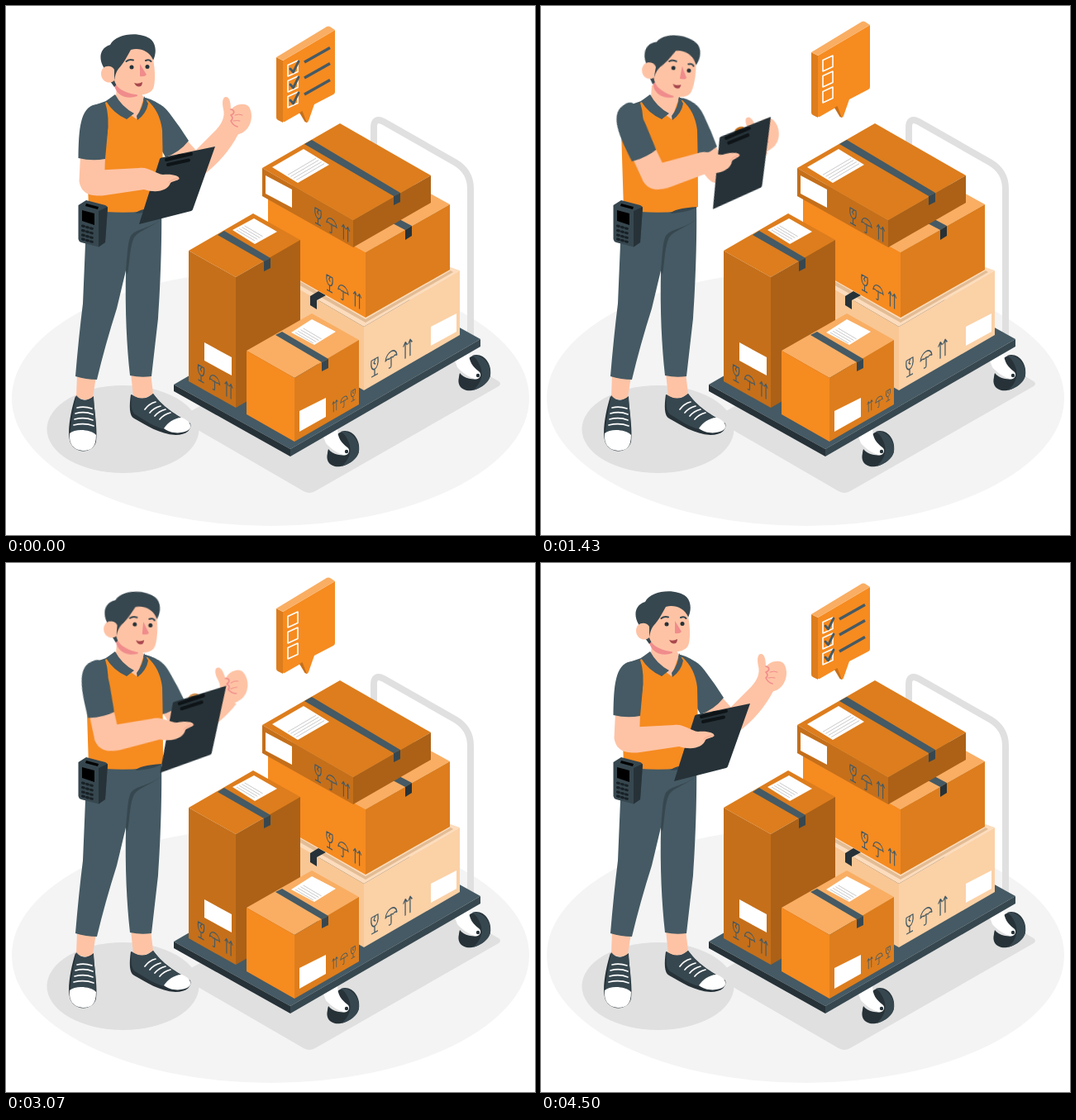
Write an HTML page that moves like this. It is 640 px wide and 640 px high and loops after 4780 ms.

```html
<!DOCTYPE html>
<html lang="en">
<head>
<meta charset="utf-8">
<title>Delivery check</title>
<style>
html, body { margin: 0; width: 100%; height: 100%; overflow: hidden; background: #fff; }
svg { display: block; width: 100vw; height: 100vh; }

.or { fill: #f68b20; } .or1 { fill: #dd7d1d; } .or2 { fill: #c56f1a; } .or3 { fill: #ac6116; }
.light { fill: #f9ae63; } .pale { fill: #fbd1a6; }
.slate { fill: #455a64; } .deep { fill: #37474f; } .night { fill: #263238; }
.skin { fill: #fec3a5; } .pink { fill: #f08c8c; } .grey { fill: #e0e0e0; } .white { fill: #fff; }
.line { fill: none; stroke-linecap: round; stroke-linejoin: round; }
.text { stroke: #c4c4c4; stroke-width: .9; fill: none; }
.ico { stroke: #455a64; stroke-width: 1.3; fill: none; stroke-linejoin: round; }

.a { animation: 4780ms linear infinite; }
#head { animation-name: head; transform-origin: 151px 117px; }
#bubble { animation-name: bubble; }
#front { animation-name: front; transform-origin: 107px 140px; }
#fore { animation-name: fore; transform-origin: 103px 212px; }
#back { animation-name: back; transform-origin: 183px 128px; }
#backFore { animation-name: backFore; transform-origin: 230px 193px; }
#hand { animation-name: hand; transform-origin: 272px 148px; }
#board { animation-name: board; transform-origin: 186px 185px; }
#knob { animation-name: knob; }
#smile { animation-name: smile; }
#flat { animation-name: flat; }
.tick { animation-name: tick; }
.tick.late { animation-name: tickLate; }
.row { stroke-dasharray: 1 2; }
#row1 { animation-name: row1; } #row2 { animation-name: row2; } #row3 { animation-name: row3; }

@keyframes head {
  0%, 11.9% { transform: rotate(0deg); animation-timing-function: ease-in; }
  19.46% { transform: rotate(2.5deg); }
  29.92% { transform: rotate(11deg); animation-timing-function: ease-out; }
  40.4%, 47.9% { transform: rotate(14.5deg); animation-timing-function: ease-in-out; }
  56.7% { transform: rotate(11deg); animation-timing-function: ease-in-out; }
  71.1%, 100% { transform: rotate(0deg); }
}
@keyframes bubble {
  0%, 11.9% { transform: translateY(0); animation-timing-function: ease-in; }
  19.46% { transform: translateY(-1px); }
  29.92% { transform: translateY(-6px); }
  40.4% { transform: translateY(-11px); animation-timing-function: ease-out; }
  49%, 58.6% { transform: translateY(-12.5px); animation-timing-function: ease-in-out; }
  71.76% { transform: translateY(2px); animation-timing-function: ease-in-out; }
  86%, 100% { transform: translateY(0); }
}
@keyframes front {
  0%, 11.9% { transform: rotate(0deg); animation-timing-function: ease-in; }
  19.46% { transform: rotate(-14deg); animation-timing-function: ease-out; }
  29.92% { transform: rotate(-27.5deg); animation-timing-function: ease-out; }
  40.4%, 57.5% { transform: rotate(-29deg); animation-timing-function: ease-in-out; }
  71.1%, 100% { transform: rotate(0deg); }
}
@keyframes fore {
  0%, 11.9% { transform: rotate(0deg); animation-timing-function: ease-in; }
  19.46% { transform: rotate(8deg); animation-timing-function: ease-out; }
  29.92% { transform: rotate(15.5deg); animation-timing-function: ease-out; }
  40.4%, 57.5% { transform: rotate(16.4deg); animation-timing-function: ease-in-out; }
  71.1%, 100% { transform: rotate(0deg); }
}
@keyframes back {
  0%, 11.9% { transform: rotate(0deg); animation-timing-function: ease-in; }
  19.46% { transform: rotate(4deg); animation-timing-function: ease-out; }
  29.92% { transform: rotate(12deg); animation-timing-function: ease-out; }
  40.4%, 57.5% { transform: rotate(14deg); animation-timing-function: ease-in-out; }
  71.1%, 100% { transform: rotate(0deg); }
}
@keyframes backFore {
  0%, 11.9% { transform: rotate(0deg); animation-timing-function: ease-in; }
  19.46% { transform: rotate(0deg); animation-timing-function: ease-out; }
  29.92% { transform: rotate(3deg); animation-timing-function: ease-out; }
  40.4%, 57.5% { transform: rotate(7deg); animation-timing-function: ease-in-out; }
  71.1%, 100% { transform: rotate(0deg); }
}
@keyframes hand {
  0%, 11.9% { transform: rotate(0deg); animation-timing-function: ease-in; }
  19.46% { transform: rotate(-9deg); animation-timing-function: ease-out; }
  29.92% { transform: rotate(-34deg); animation-timing-function: ease-out; }
  40.4%, 57.5% { transform: rotate(-44deg); animation-timing-function: ease-in-out; }
  71.76% { transform: rotate(-3deg); animation-timing-function: ease-in-out; }
  77.4% { transform: rotate(-6deg); animation-timing-function: ease-in-out; }
  84% { transform: rotate(2deg); animation-timing-function: ease-in-out; }
  91.2%, 100% { transform: rotate(0deg); }
}
@keyframes board {
  0%, 11.9% { transform: matrix(1, 0, 0, 1, 0, 0); animation-timing-function: ease-in; }
  19.46% { transform: matrix(.995, -.087, .112, 1.01, 17, -9); animation-timing-function: ease-out; }
  29.92% { transform: matrix(.972, -.155, .206, 1.039, 30, -25); animation-timing-function: ease-out; }
  40.4%, 57.5% { transform: matrix(.981, -.165, .247, 1.062, 31, -30); animation-timing-function: ease-in-out; }
  71.1%, 100% { transform: matrix(1, 0, 0, 1, 0, 0); }
}
@keyframes knob { 0%, 13% { opacity: 0; } 18%, 63% { opacity: 1; } 69%, 100% { opacity: 0; } }
@keyframes smile { 0%, 34% { opacity: 1; } 34.1%, 62% { opacity: 0; } 62.1%, 100% { opacity: 1; } }
@keyframes flat { 0%, 34% { opacity: 0; } 34.1%, 62% { opacity: 1; } 62.1%, 100% { opacity: 0; } }
@keyframes tick { 0%, 1% { opacity: 1; } 11.9%, 66% { opacity: 0; } 71.76% { opacity: .6; } 76%, 100% { opacity: 1; } }
@keyframes tickLate { 0%, 1% { opacity: 1; } 11.9%, 72.5% { opacity: 0; } 82%, 100% { opacity: 1; } }
@keyframes row1 {
  0%, 1% { stroke-dashoffset: 0; animation-timing-function: ease-in-out; }
  11.9%, 65% { stroke-dashoffset: 1; }
  71.76% { stroke-dashoffset: .48; animation-timing-function: ease-out; }
  94.1%, 100% { stroke-dashoffset: 0; }
}
@keyframes row2 {
  0%, 1% { stroke-dashoffset: 0; animation-timing-function: ease-in-out; }
  11.9%, 67% { stroke-dashoffset: 1; }
  71.76% { stroke-dashoffset: .72; animation-timing-function: ease-out; }
  94.1%, 100% { stroke-dashoffset: 0; }
}
@keyframes row3 {
  0%, 1% { stroke-dashoffset: 0; animation-timing-function: ease-in-out; }
  11.9%, 72.2% { stroke-dashoffset: 1; animation-timing-function: ease-out; }
  94.1%, 100% { stroke-dashoffset: 0; }
}
</style>
</head>
<body>
<svg viewBox="0 0 640 640">
  <defs>
    <g id="glass" class="ico"><path d="M-4-9H4C5-2 3 2 0 2S-5-2-4-9ZM0 2V9M-4 9H4M1-9L-1-5L1-3"/></g>
    <g id="umbrella" class="ico"><path d="M-7 0C-6-10 6-10 7 0Q4.500-2 2.300 0Q0-2-2.300 0Q-4.500-2-7 0ZM0-1V8Q0 11-3 9.500"/></g>
    <g id="arrows" class="ico"><path d="M-3 9V-8M-5.500-5L-3-9L-.5-5M3 9V-8M.5-5L3-9L5.500-5"/></g>
    <g id="iconsL">
      <use href="#glass" transform="matrix(.87 .5 0 1 0 0)"/>
      <use href="#umbrella" transform="matrix(.87 .5 0 1 16.500 10)"/>
      <use href="#arrows" transform="matrix(.87 .5 0 1 33.500 20)"/>
    </g>
    <path id="print" class="text" d="M0 0l22 13M3.200-1.700l22 13M6.400-3.400l22 13M9.600-5.100l22 13"/>
    <g id="wheel">
      <path class="night" d="M389 541C391 528 400 515 410 514C421 514 429 526 427 539C424 551 408 559 398 557C390 555 387 549 389 541Z"/>
      <path class="deep" d="M405 515C416 512 429 526 427 539C425 548 416 554 406 557C414 550 418 541 416 532C414 524 410 518 405 515Z"/>
      <path class="white" d="M384 521L401 512C401 522 406 529 413 534C417 537 415 543 410 543.500C400 543 391 537 387 529Z"/>
      <path class="grey" d="M387 529C393 536 401 541 410 543.500C400 544 389 540 387 529Z"/>
      <circle class="night" cx="412" cy="539" r="2.200"/>
    </g>
  </defs>

  <ellipse cx="320" cy="474.500" rx="313" ry="154.500" fill="#f4f4f4"/>
  <ellipse class="grey" cx="141.500" cy="512" rx="92" ry="53"/>
  <path class="grey" d="M222 491L242 480L540 421L596 454Q600 457 596 460L374 587Q367 591 360 587L222 507Z"/>

  <!-- trolley -->
  <path class="line" d="M445 170V147Q445 134 457 140L543 189Q562 200 562 221V402" stroke="#e0e0e0" stroke-width="8"/>
  <use href="#wheel"/>
  <use href="#wheel" x="159" y="-92"/>
  <path class="slate" d="M203 458L433 325L574 403L344 536Z"/>
  <path class="night" d="M203 458L344 536V545L203 466Z"/>
  <path class="deep" d="M344 536L574 403V412L344 545Z"/>

  <!-- pale box -->
  <path fill="#fcdcbc" d="M340 334L435 280L549 320L433 388Z"/>
  <path fill="#f9c794" d="M340 334L433 388V465L340 412Z"/>
  <path class="pale" d="M433 388L549 320V398L433 465Z"/>
  <path fill="#e2bc95" d="M352 331L435 379L538 320L541 322L435 383L352 336Z"/>
  <path class="night" d="M368 351L378 345L387 350L376 356V367L368 362Z"/>
  <path class="white" d="M514 388L545 372V394L514 411Z"/>
  <use href="#glass" transform="matrix(.98 -.56 0 1.100 446 437)"/>
  <use href="#umbrella" transform="matrix(.98 -.56 0 1.100 466 426)"/>
  <use href="#arrows" transform="matrix(.98 -.56 0 1.100 486 415)"/>

  <!-- middle box -->
  <path class="light" d="M317 233L419 175L537 240L435 298Z"/>
  <path class="or" d="M317 233L435 298V377L317 310Z"/>
  <path class="or1" d="M435 298L537 240V319L435 377Z"/>
  <path class="slate" d="M466 262L474 257L491 266L483 271Z"/>
  <path class="night" d="M483 271L491 266V278L483 283Z"/>
  <use href="#iconsL" x="391.500" y="336"/>

  <!-- top box -->
  <path class="or1" d="M310 196L404 142L514 205L420 259Z"/>
  <path class="or2" d="M310 196L420 259V292L310 230Z"/>
  <path class="or3" d="M420 259L514 205V238L420 292Z"/>
  <path class="slate" d="M361 167L370 162L477 226L469 230Z"/>
  <path class="deep" d="M469 230L477 226V237L469 241Z"/>
  <path class="white" d="M322 195L360 173L391 192L353 214Z"/>
  <path class="text" d="M341 204.300l34-20M344.400 206.400l34-20M347.800 208.500l34-20M351.200 210.600l34-20"/>
  <path class="white" d="M314 205L346 222V244L314 227Z"/>
  <use href="#iconsL" x="377.500" y="255"/>

  <!-- tall box -->
  <path class="or1" d="M221 296L299 251L356 283L278 328Z"/>
  <path class="or2" d="M221 296L278 328V486L221 454Z"/>
  <path class="or3" d="M278 328L356 283V441L278 486Z"/>
  <path class="slate" d="M256 277L264 272L320 305L312 309Z"/>
  <path class="deep" d="M312 309L320 305V317L312 321Z"/>
  <path class="white" d="M274 271L300 257L328 273L301 288Z"/>
  <use href="#print" x="279" y="271"/>
  <path class="white" d="M240 407L273 425V447L240 429Z"/>
  <use href="#iconsL" x="236" y="445"/>

  <!-- small box -->
  <path class="light" d="M291 417L370 372L427 404L349 450Z"/>
  <path class="or" d="M291 417L349 450V527L291 494Z"/>
  <path class="or1" d="M349 450L427 404V482L349 527Z"/>
  <path class="slate" d="M326 398L334 394L390 427L382 431Z"/>
  <path class="deep" d="M382 431L390 427V438L382 442Z"/>
  <path class="white" d="M345 395L370 379L399 394L373 410Z"/>
  <use href="#print" x="350" y="395"/>
  <path class="white" d="M355 490L387 474V497L355 515Z"/>
  <use href="#glass" transform="matrix(.6 -.35 0 .7 420 471)"/>
  <use href="#umbrella" transform="matrix(.6 -.35 0 .7 409 478)"/>
  <use href="#arrows" transform="matrix(.6 -.35 0 .7 398 484)"/>

  <!-- speech bubble -->
  <g id="bubble" class="a">
    <path class="or" d="M335 66L398 29V104Q398 106 396 107L373 119L366 139Q364 143 362 139L358 128L337 140Q335 141 335 139Z"/>
    <path class="or2" d="M355 129L358.500 127L364 141L361.500 140Z"/>
    <path class="or1" d="M327 62L335 66V141L329 138Q327 137 327 135Z"/>
    <path class="light" d="M327 62L388 25Q390 24 392 25L398 29L335 66Z"/>
    <path class="line" d="M341 71.500L353 66V79.500L341 85ZM341 90.500L353 85V98.500L341 104ZM341 109.500L353 104V117.500L341 123Z" stroke="#fff" stroke-width="1.600"/>
    <g class="line" stroke="#455a64" stroke-width="2.800">
      <path class="a tick" d="M344 76L347.500 80L354 67"/>
      <path class="a tick" d="M344 95L347.500 99L354 86"/>
      <path class="a tick late" d="M344 114L347.500 118L354 105"/>
    </g>
    <g fill="none" stroke="#455a64" stroke-width="3.400">
      <path id="row1" class="a row" pathLength="1" d="M361 68L392 50.500"/>
      <path id="row2" class="a row" pathLength="1" d="M361 87L392 69.500"/>
      <path id="row3" class="a row" pathLength="1" d="M361 107L392 89.500"/>
    </g>
  </g>

  <!-- far arm -->
  <g id="back" class="a">
    <path class="skin" d="M190 160L215 158L242 188Q238 208 224 206Q214 203 192 175Z"/>
    <g id="backFore" class="a">
      <path class="skin" d="M219 185L257 147L281 155Q266 184 238 205Q224 209 218 198Z"/>
      <g id="hand" class="a">
        <path class="skin" d="M255 149C262 141 265 133 263 125C261 117 262 110 266 110C271 110 272 118 272 126C276 119 289 116 294 122C298 128 298 138 294 145C290 153 282 156 273 157Z"/>
        <path class="line" d="M272 125C277 126 277 130 272 132Q276 136 272 139Q275 145 280 146" stroke="#f08c8c" stroke-width="1.600"/>
        <path class="line" d="M277 132Q282 130 286 132M275 139Q280 138 283 139" stroke="#f08c8c" stroke-width="1"/>
      </g>
    </g>
    <path class="slate" d="M168 114C184 115 191 121 198 130Q211 147 221 163Q210 177 193 183L180 160Z"/>
  </g>

  <!-- legs -->
  <path class="skin" d="M86 446L109 448L105 474Q95 479 85 473ZM151 444L175 444L178 469Q166 478 154 473Z"/>
  <path class="night" d="M84 472C79 488 74 512 77 525C80 542 105 543 109 527C111 508 106 486 106 472C100 478 90 479 84 472Z"/>
  <path class="deep" d="M85 471C82 488 78 504 78 518L108 520C110 504 106 484 106 473C100 479 90 478 85 471Z"/>
  <path class="white" d="M77 517C84 511 102 512 109 519C109 533 104 538 93 538C81 537 76 530 77 517Z"/>
  <path class="line" d="M86 486Q95 484 104 487M84 493Q95 490 105 494M83 500Q95 497 105 501M82 507Q95 504 106 508" stroke="#fff" stroke-width="1.700"/>
  <path class="night" d="M151 470C149 484 149 496 155 499C169 507 186 518 205 519C219 519 225 512 223 505C210 496 193 489 178 469C169 477 160 476 151 470Z"/>
  <path class="deep" d="M152 470C151 481 151 490 156 494C168 501 180 510 192 512L213 499C199 491 189 484 178 469C169 477 160 476 152 470Z"/>
  <path class="white" d="M191 511C195 504 206 497 213 498C222 502 225 507 222 512C215 518 199 518 191 511Z"/>
  <path class="line" d="M168 488Q173 481 181 479M174 492Q179 486 187 484M180 496Q185 490 193 488M186 500Q191 494 199 492" stroke="#fff" stroke-width="1.700"/>
  <path class="slate" d="M98 240L188 240C189 290 186 350 184 378L176 448Q163 450 150 447C146 410 144 370 145 320L134 366Q120 410 110 452Q97 452 84 448Q88 400 93 360Z"/>
  <path class="deep" d="M188 258C176 268 160 272 155 280C150 290 150 305 147 325L145 320C147 300 147 286 151 278C158 269 172 270 188 258Z"/>

  <!-- torso -->
  <path class="slate" d="M104 121L121 115L134 108L169 111Q184 115 188 123L190 150L120 160L97 145Q95 127 104 121Z"/>
  <path class="or" d="M120 117L130 112L171 114Q186 127 189 150Q190 190 190 243Q150 255 100 246L97 150L122 158Q126 135 120 117Z"/>
  <path class="deep" d="M157 251Q160 245 189 243Q180 249 157 251Z"/>
  <path class="skin" d="M134 96L160 100L167 111L158 137L147 129L133 110Z"/>
  <path class="slate" d="M132 107L121 115Q130 130 146 137L155 130Q140 122 132 107Z"/>
  <path class="slate" d="M167 109L172 118Q170 130 159 138L158 133Q166 123 167 109Z"/>

  <!-- head -->
  <g id="head" class="a">
    <path class="pink" d="M130 92C131 101 136 108 144 110Q151 112 159 109L158 104L134 88Z"/>
    <path class="deep" d="M118 74C112 64 113 51 126 47C133 33 163 30 176 41C182 47 182 58 178 66L150 78L131 98L126 91Z"/>
    <path class="skin" d="M136 76C142 70 147 60 151 53C161 50 173 54 178 65C180 74 181 88 179 97C177 107 164 109 151 106C140 103 133 98 131 90C132 84 133 80 136 76Z"/>
    <path class="skin" d="M131 77C127 70 115 72 115 82C115 91 125 96 131 90Z"/>
    <path class="line" d="M145.500 67Q149 64 154 65.500M169 66Q173 64 175.500 67" stroke="#37474f" stroke-width="2"/>
    <circle class="night" cx="152" cy="74" r="2.500"/>
    <circle class="night" cx="171" cy="73.500" r="2.500"/>
    <path class="pink" d="M162 70L170 83Q168 86 162 85Z"/>
    <path id="smile" class="a" d="M155 93Q160 95 165 92Q165 98 160 97.500Q157 97 155 93Z" fill="#a8484e"/>
    <path id="flat" class="a line" d="M156 96Q161 96 166 94" stroke="#a8484e" stroke-width="1.500"/>
  </g>

  <!-- scanner -->
  <path class="deep" d="M87.500 241L97 235L120 241Q123 242 123 245L120 286L112 291.500L91 286Q88 285 87.500 282Z"/>
  <path class="night" d="M112 248L123 243L120 286L112 291.500Z"/>
  <path d="M97 239L112 243L111 246L96 242ZM92 247L107 251V265L92 260Z"/>
  <path class="line" d="M92.500 266L106.500 270M92.500 271.500L106.500 275.500M92.500 277L106.500 281M92.500 282L106.500 286" stroke="#172025" stroke-width="3" stroke-dasharray="2 3.200"/>

  <!-- clipboard -->
  <g id="board" class="a">
    <ellipse id="knob" class="a or2" cx="212" cy="179" rx="6.500" ry="3" transform="rotate(-13 212 179)"/>
    <path class="night" d="M186 185Q186 184 188 183.500L253 170L226 246Q225.500 247.500 224 248L161 264Z"/>
    <path class="line" d="M194 186L224 179M196 192L221 186.500" stroke="#0e1417" stroke-width="4"/>
    <path d="M204 183Q207 179 212 179Q216 178 218 181Z" fill="#0e1417"/>
  </g>

  <!-- near arm -->
  <g id="front" class="a">
    <path class="skin" d="M90 180L120 181L119 212A15.500 16 0 0 1 88.500 212Z"/>
    <g id="fore" class="a">
      <path class="skin" d="M104 199L161 196C172 194 181 203 190 204C203 203 210 206 209.500 209C207 212 203 211 199 214C196 223 183 227 167 222L120 229C105 231 90 228 89 212Z"/>
      <path class="line" d="M209 209Q203 208 197 213" stroke="#f2a58f" stroke-width=".9"/>
    </g>
    <path class="slate" d="M105 120Q117 116 121 122Q124 140 123 152L120 185Q104 188 87.500 184C88 158 88 126 105 120Z"/>
  </g>
</svg>
</body>
</html>
```
